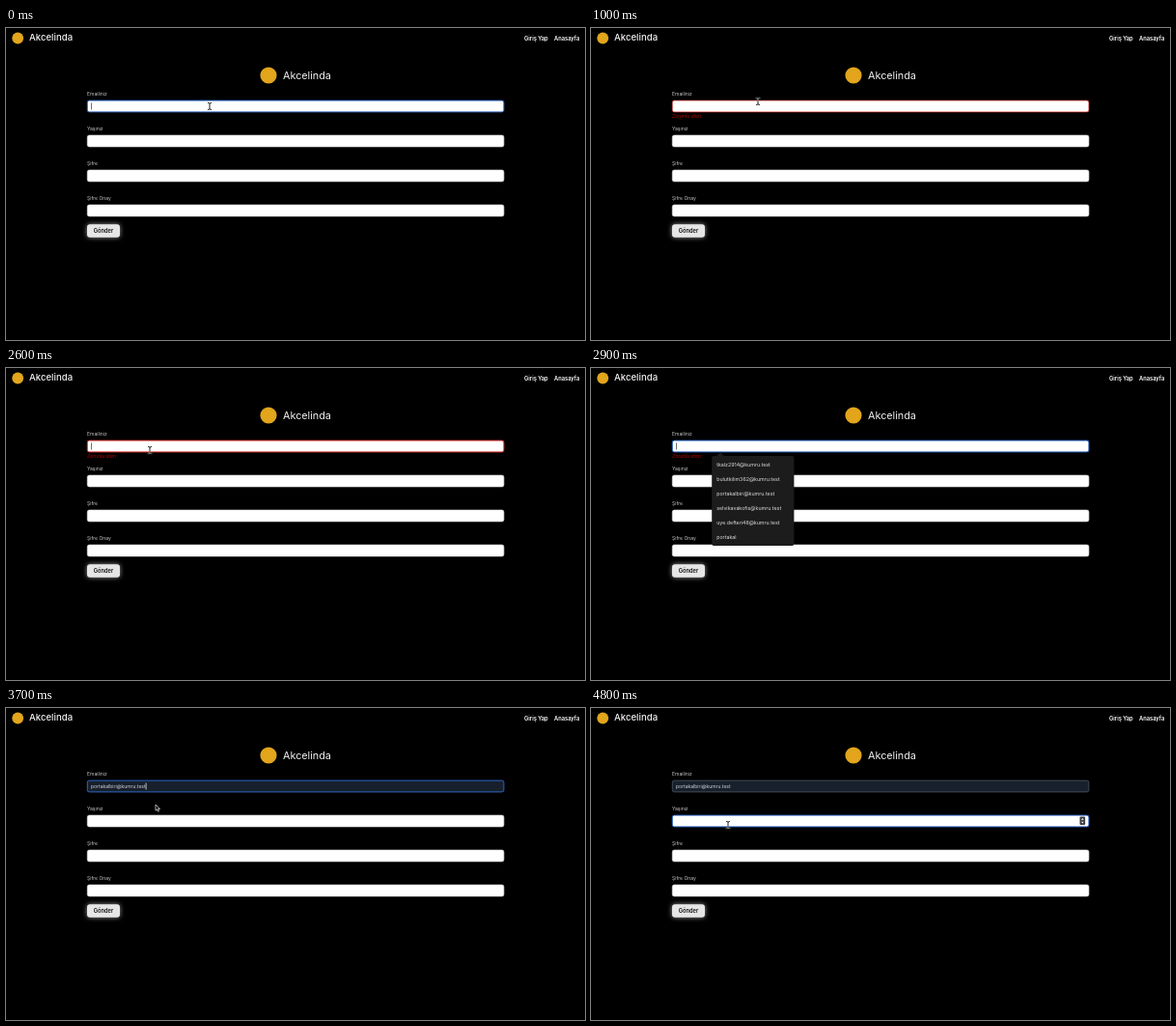
An HTML page for the animation above (5 s loop, 600 by 323 pixels).

```html
<!DOCTYPE html>
<html lang="tr">
<head>
<meta charset="utf-8">
<title>Kayıt formu</title>
<style>
  html, body { margin: 0; width: 100%; height: 100%; overflow: hidden; background: #000; }
  svg { display: block; width: 100%; height: 100%; }
  text { font-family: Inter, "Noto Sans", sans-serif; font-size: 5px; fill: #c8c8c8; }
  .brand { fill: #f2f2f2; }
  .nav { font-size: 5.75px; font-weight: 600; fill: #fff; }
  .coin { fill: #e2a51c; }
  .error { fill: #b40000; font-style: italic; }
  .item { font-size: 5.3px; fill: #dedede; }
  .button { filter: drop-shadow(0 0 2.5px rgba(255, 255, 255, .6)); }
</style>
</head>
<body>
<svg id="stage" viewBox="0 0 600 323">
  <circle class="coin" cx="12.2" cy="10.5" r="5.9"/>
  <text class="brand" x="24" y="13" font-weight="500" style="font-size:9.6px">Akcelinda</text>
  <text class="nav" x="537" y="12.5">Giriş Yap</text>
  <text class="nav" x="568" y="12.5">Anasayfa</text>
  <circle class="coin" cx="272" cy="49" r="8.6"/>
  <text class="brand" x="287" y="53" style="font-size:10.8px">Akcelinda</text>
  <g id="fields"></g>
  <rect class="button" x="84" y="203.3" width="34" height="13.4" rx="3" fill="#e6e6e6"/>
  <text x="101" y="212.1" text-anchor="middle" style="font-size:5.7px;font-weight:600;fill:#111">Gönder</text>
  <text id="email" x="88" y="82.7"></text>
  <text id="error" class="error" x="84" y="93"></text>
  <g id="spinner">
    <rect x="506.5" y="112.6" width="5.6" height="8.4" rx="1" fill="#3a3f44"/>
    <path d="M507.9 115.8l1.4-1.8 1.4 1.8zM507.9 117.8l1.4 1.8 1.4-1.8z" fill="#fff"/>
  </g>
  <rect id="caret" width=".7" height="7" />
  <g id="popup">
    <path d="M129.5 91.5L134 87.5 138.500 91.5z" fill="#1c1c1c"/>
    <rect id="panel" x="125.2" y="91" rx="2" fill="#1c1c1c"/>
    <rect id="hover" x="127" y="93.500" width="76.5" height="13" rx="1.5" fill="#303236"/>
    <g id="items"></g>
  </g>
  <g id="ibeam" fill="none" stroke-linecap="round">
    <path d="M-1.6-3.6Q0-3.6 0-2.6V2.6Q0 3.6-1.6 3.6M1.6-3.6Q0-3.6 0-2.6M0 2.6Q0 3.6 1.6 3.6" stroke="#ddd" stroke-width="1.5"/>
    <path d="M-1.6-3.6Q0-3.6 0-2.6V2.6Q0 3.6-1.6 3.6M1.6-3.6Q0-3.6 0-2.6M0 2.6Q0 3.6 1.6 3.6" stroke="#111" stroke-width=".8"/>
  </g>
  <path id="arrow" d="M0 0V6.200L1.500 4.900 2.500 7.200 3.500 6.800 2.500 4.500H4.500z" fill="#000" stroke="#eee" stroke-width=".7"/>
</svg>
<script>
const LOOP = 5000;
const ADDRESS = 'portakalbiri@kumru.test';
const SUGGESTIONS = ['tkalz2914@kumru.test', 'bulutkilim362@kumru.test', ADDRESS,
  'selvikavakofis@kumru.test', 'uye.defteri48@kumru.test', 'portakal'];
const LABELS = ['Emailiniz', 'Yaşınız', 'Şifre', 'Şifre Onay'];
const REQUIRED = 'Zorunlu alan';
const INVALID = 'Geçerli bir mail formatı giriniz';
const BLUE = '#2c66c4', RED = '#e0352f';

const $ = id => document.getElementById(id);
const show = (node, on) => { node.style.display = on ? '' : 'none'; };
const set = (node, attrs) => {
  for (const key in attrs) node.setAttribute(key, attrs[key]);
  return node;
};
const add = (parent, tag, attrs, content = '') => {
  const node = set(document.createElementNS('http://www.w3.org/2000/svg', tag), attrs);
  node.textContent = content;
  return parent.appendChild(node);
};
const fieldY = index => 75 + 36 * index;

const boxes = LABELS.map((label, i) => {
  add($('fields'), 'text', { x: 84, y: fieldY(i) - 4.9 }, label);
  return add($('fields'), 'rect', { x: 84.3, y: fieldY(i) + .1, width: 431.6, height: 11.8, rx: 2 });
});

const ibeam = (x, y) => ({ pointer: 'ibeam', x, y });
const arrow = (x, y) => ({ pointer: 'arrow', x, y });

// Each step changes only the listed parts of the state.
const STEPS = [
  [0, { ...ibeam(211, 81), focus: 0, caret: true, border: BLUE, text: '', error: '',
        popup: false, hover: false, filled: false, spinner: false }],
  [100, ibeam(209, 78)],
  [200, arrow(204, 69)],
  [300, arrow(196, 64)],
  [400, { focus: -1, border: RED, error: REQUIRED }],
  [500, arrow(188, 66)],
  [600, arrow(180, 70)],
  [1000, ibeam(173, 76)],
  [1100, ibeam(174, 77)],
  [1200, ibeam(175, 79)],
  [1300, ibeam(176, 80)],
  [2100, ibeam(168, 85)],
  [2200, arrow(156, 90)],
  [2400, ibeam(149, 85)],
  [2500, { focus: 0 }],
  [2700, { border: BLUE }],
  [2800, { popup: true }],
  [2900, { pointer: '' }],
  [3000, { text: 'p', error: INVALID }],
  [3100, { text: 'po' }],
  [3200, arrow(155, 90)],
  [3400, { ...arrow(155, 96), hover: true }],
  [3500, { popup: false, hover: false, text: ADDRESS, error: '', filled: true }],
  [3600, arrow(155, 100)],
  [4000, arrow(153, 103)],
  [4100, arrow(148, 108)],
  [4200, { ...ibeam(144, 116), spinner: true }],
  [4300, { ...ibeam(142, 121), focus: 1 }],
  [4800, { caret: false }],
];

const stateAt = time =>
  Object.assign({}, ...STEPS.filter(([start]) => start <= time).map(([, change]) => change));

function drawFields(s) {
  boxes.forEach((box, i) => {
    const dark = i === 0 && s.filled;
    const focused = s.focus === i;
    const stroke = i === 0 && !s.filled ? s.border : focused ? BLUE : dark ? '#56606c' : '#e4e4e4';
    set(box, { fill: dark ? '#17202c' : '#fff', stroke, 'stroke-width': focused ? 1 : .7 });
  });
  $('email').textContent = s.text;
  $('email').style.fill = s.filled ? '#d2d6dc' : '#222';
  $('error').textContent = s.error;
  show($('spinner'), s.spinner);

  show($('caret'), s.caret && s.focus >= 0);
  const offset = s.focus === 0 && s.text ? $('email').getComputedTextLength() : 0;
  set($('caret'), {
    x: 88.1 + offset,
    y: fieldY(Math.max(s.focus, 0)) + 2.5,
    fill: s.focus === 0 && s.filled ? '#fff' : '#333',
  });
}

function drawPopup(s) {
  show($('popup'), s.popup);
  show($('hover'), s.hover);
  const matches = SUGGESTIONS.filter(name => !s.text || name.startsWith(s.text));
  set($('panel'), { width: s.text ? 80 : 85.2, height: 3 + 15 * matches.length });
  $('items').replaceChildren();
  matches.forEach((name, i) =>
    add($('items'), 'text', { class: 'item', x: 130.2, y: 101.9 + 15 * i }, name));
}

function drawPointer(s) {
  for (const kind of ['ibeam', 'arrow']) {
    show($(kind), s.pointer === kind);
    set($(kind), { transform: `translate(${s.x} ${s.y})` });
  }
}

const origin = performance.now();
let lastStep = -1;

function frame() {
  const time = Math.max(0, performance.now() - origin) % LOOP;
  const step = STEPS.filter(([start]) => start <= time).length;
  if (step !== lastStep) {
    const state = stateAt(time);
    drawFields(state);
    drawPopup(state);
    drawPointer(state);
    lastStep = step;
  }
  requestAnimationFrame(frame);
}
frame();
</script>
</body>
</html>
```
